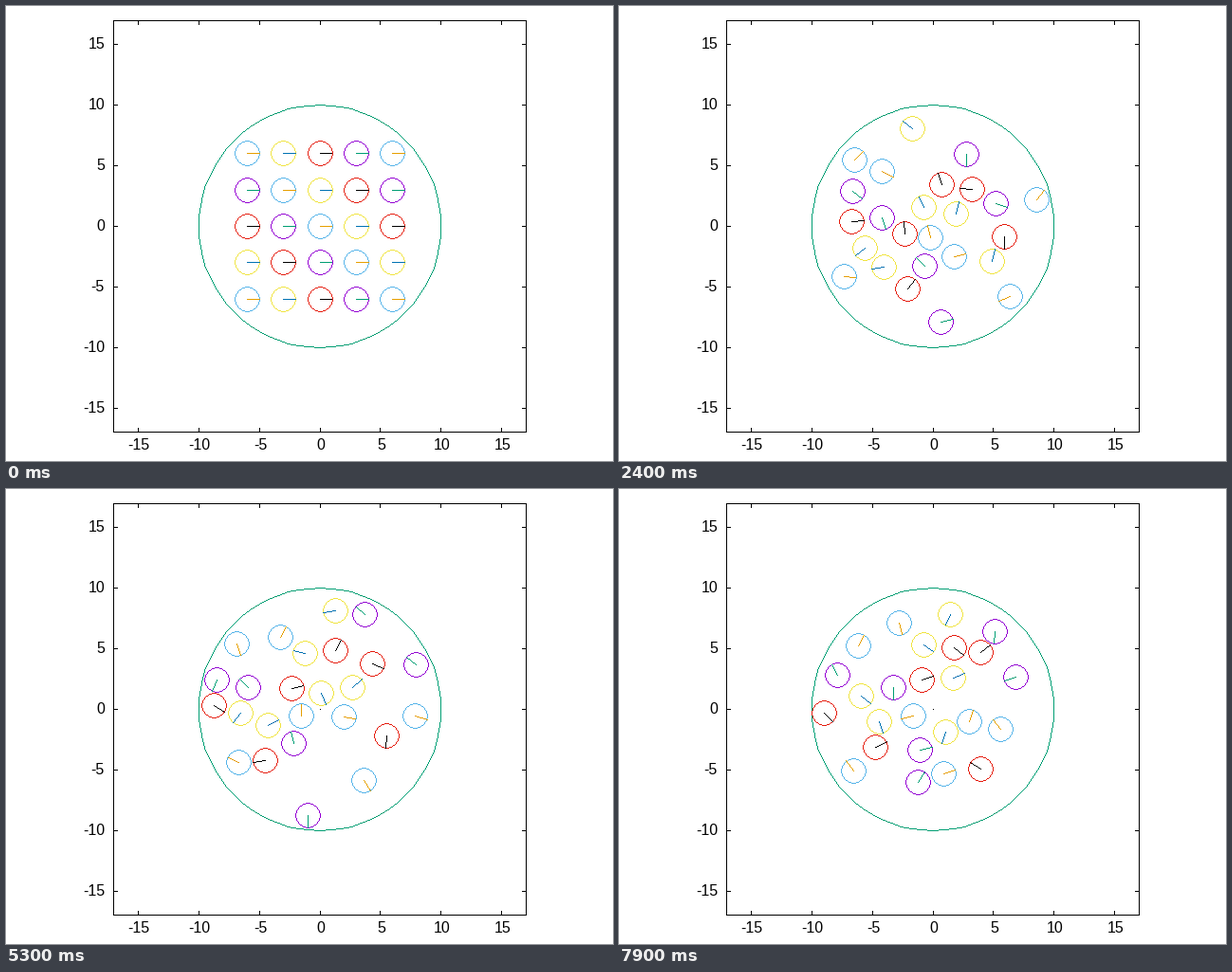
Write a matplotlib script that moves like this. It is 640x480 px and loops after 8 s.

```python
import itertools

import numpy as np
import matplotlib.pyplot as plt
from matplotlib.animation import FuncAnimation

plt.rcParams["font.family"] = "Liberation Sans"

DPI, FRAMES, STEP = 100, 80, 100
LEFT, RIGHT, TOP, BOTTOM = 113, 548, 15, 449
CX, CY = (LEFT + RIGHT) / 2, (TOP + BOTTOM) / 2
UNIT = (RIGHT - LEFT) / 34
WALL, RADIUS, SPIN = 10, 1, 3.0
SUBSTEPS = 5
GREEN = "#009e73"
# rim and spoke colours, repeating along the columns of the grid
COLORS = [("#56b4e9", "#e69f00"), ("#f0e442", "#0072b2"),
          ("#e51e10", "#000000"), ("#9400d3", GREEN)]


def collide(i, j, pos, vel, spin):
    """Elastic hit of two rough, equal discs that exchange spin."""
    gap = pos[j] - pos[i]
    dist = np.hypot(*gap)
    if dist >= 2 * RADIUS:
        return
    normal = gap / dist
    tangent = np.array([-normal[1], normal[0]])
    rel = vel[j] - vel[i]
    closing = rel @ normal
    if closing >= 0:
        return
    slip = rel @ tangent - RADIUS * (spin[i] + spin[j])
    impulse = -closing * normal - slip / 6 * tangent
    vel[i] -= impulse
    vel[j] += impulse
    spin[[i, j]] += slip / (3 * RADIUS)


def simulate():
    """Return positions and angles of all discs for every frame."""
    rng = np.random.default_rng(4)
    grid = np.arange(-6.0, 7, 3)
    pos = np.array(list(itertools.product(grid, grid)))
    x, y = pos.T
    # a slow inward swirl with some scatter
    vel = np.column_stack([-0.14 * x + 0.06 * y, -0.14 * y - 0.06 * x])
    vel += rng.normal(0, 0.75, vel.shape)
    spin = np.full(len(pos), SPIN)
    angle = np.zeros(len(pos))
    pairs = list(itertools.combinations(range(len(pos)), 2))
    dt = STEP / 1000 / SUBSTEPS
    states = []
    for _ in range(FRAMES):
        states.append((pos.copy(), angle.copy()))
        for _ in range(SUBSTEPS):
            pos += vel * dt
            angle += spin * dt
            for i, j in pairs:
                if abs(pos[i, 0] - pos[j, 0]) < 2 * RADIUS:
                    collide(i, j, pos, vel, spin)
            dist = np.maximum(np.hypot(*pos.T), 1e-9)
            out = pos / dist[:, None]
            speed = (vel * out).sum(axis=1)
            hit = (dist > WALL - RADIUS) & (speed > 0)
            vel[hit] -= 2 * speed[hit, None] * out[hit]
    return states


def snap(v):
    return np.floor(np.asarray(v, float) + 0.5)


def trace(xs, ys):
    """Pixels of a thin polyline without smoothing."""
    pts = snap(np.column_stack([xs, ys]))
    runs = []
    for a, b in zip(pts, pts[1:]):
        n = int(abs(b - a).max())
        runs.append(snap(a + (b - a) * np.linspace(0, 1, n + 1)[:, None]))
    return np.concatenate(runs).T


def to_px(x, y):
    return CX + x * UNIT, CY - y * UNIT


fig = plt.figure(figsize=(640 / DPI, 480 / DPI), dpi=DPI, facecolor="white")
ax = fig.add_axes([0, 0, 1, 1])
ax.set_xlim(0, 640)
ax.set_ylim(480, 0)
ax.axis("off")


def place(curve, pixels):
    # a pixel marker fills the pixel above its anchor
    curve.set_data(pixels[0], pixels[1] + 1)


def line(color, xs=(), ys=()):
    curve = ax.plot([], [], ",", color=color)[0]
    if len(xs):
        place(curve, trace(xs, ys))
    return curve


def label(x, y, value, ha):
    ax.text(x, y, str(value), fontsize=16 * 72 / DPI, ha=ha, va="baseline")


theta = np.linspace(0, 2 * np.pi, 73)
ring = UNIT * np.array([np.cos(theta), np.sin(theta)])
rim_pixels = trace(*(RADIUS * ring))

line(GREEN, CX + WALL * ring[0], CY + WALL * ring[1])
line("black", [CX, CX], [CY, CY])

states = simulate()
discs = []
for i in range(len(states[0][0])):
    rim, spoke = COLORS[i % len(COLORS)]
    discs.append((line(rim), line(spoke)))

line("black", [LEFT, RIGHT, RIGHT, LEFT, LEFT], [TOP, TOP, BOTTOM, BOTTOM, TOP])
for v in range(-15, 16, 5):
    x, y = to_px(v, v)
    for edge, inner in ((BOTTOM, BOTTOM - 4), (TOP, TOP + 4)):
        line("black", [x, x], [edge, inner])
    for edge, inner in ((LEFT, LEFT + 4), (RIGHT, RIGHT - 4)):
        line("black", [edge, inner], [y, y])
    label(x + 1.5, 468, v, "center")
    label(104, y + 4.7, v, "right")


def draw(n):
    for (x, y), a, (rim, spoke) in zip(*states[n], discs):
        px, py = to_px(x, y)
        tip = to_px(x + RADIUS * np.cos(a), y + RADIUS * np.sin(a))
        place(rim, rim_pixels + snap([[px], [py]]))
        place(spoke, trace([px, tip[0]], [py, tip[1]]))
    return [curve for disc in discs for curve in disc]


anim = FuncAnimation(fig, draw, frames=FRAMES, interval=STEP, repeat=True,
                     repeat_delay=0, blit=False)
plt.show()
```
